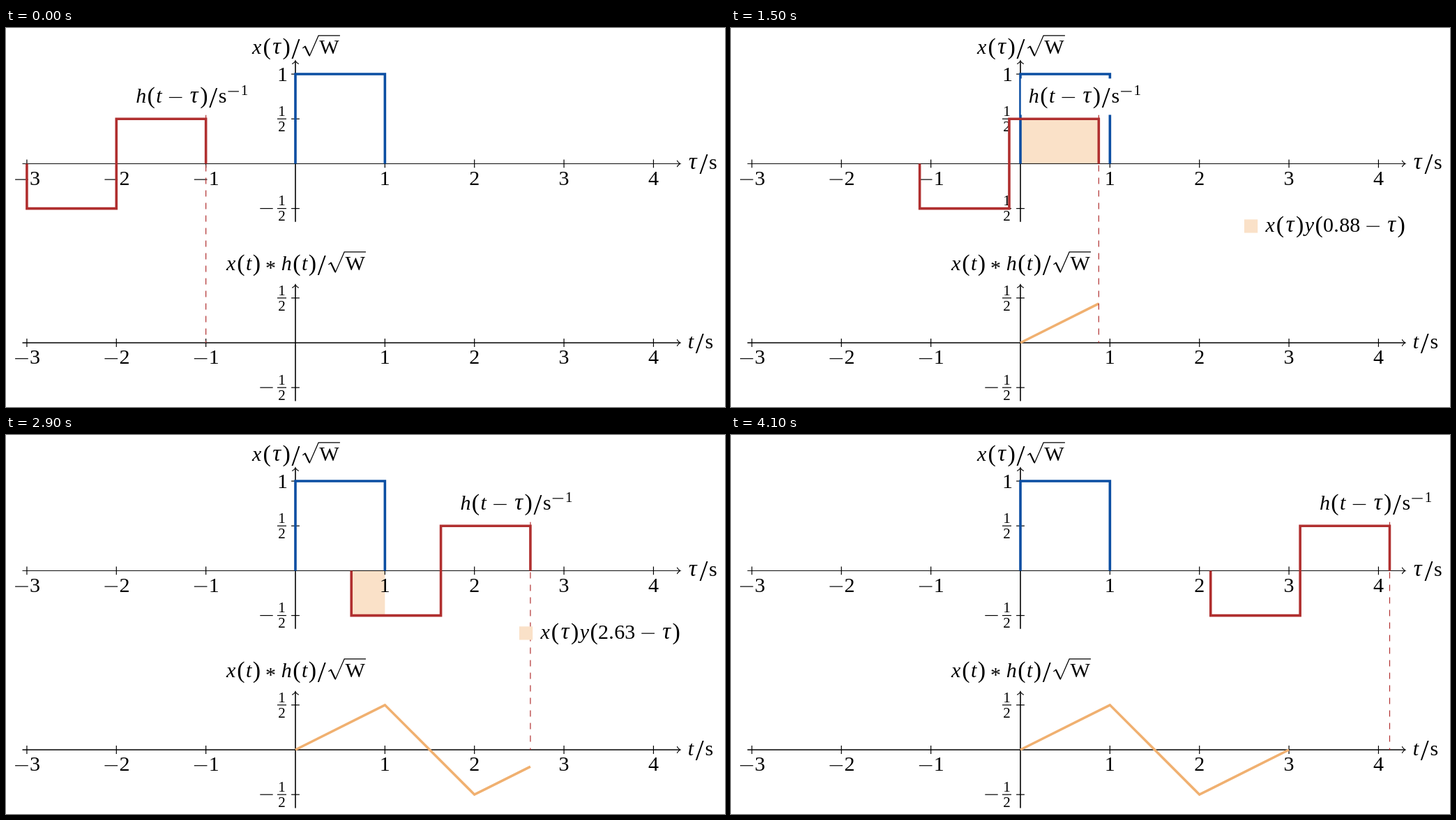
Animation of 1031 by 543 pixels, one loop 4200 ms. Source, as an HTML page:

```html
<!DOCTYPE html>
<html lang="en">
<head>
<meta charset="utf-8">
<title>Convolution of two pulses</title>
<style>
  html, body { margin: 0; width: 100%; height: 100%; overflow: hidden; background: #fff; }
  svg { display: block; font-family: "Liberation Serif", "Times New Roman", serif; }
</style>
</head>
<body>
<svg id="stage" width="1031" height="543" viewBox="0 0 1031 543"></svg>
<script>
const LOOP_MS = 4200, STEP_MS = 100;
const PT = 3, THIN = 0.4 * PT, THICK = 1.2 * PT;
const UNIT = 128.36, ORIGIN = 415, TOP = 194.4, BOTTOM = 451;
const BLUE = '#0b4ea2', RED = '#b02f2f', ORANGE = '#f0b070', PALE = '#fae1c8';

// Advance widths in points
const ADVANCE = {
  x: 5.72, t: 3.61, h: 5.76, y: 5.26, τ: 5.5, s: 3.94, W: 10.28,
  '(': 3.89, ')': 3.89, '/': 5, '√': 8.33, '−': 7.78, '*': 5, '.': 2.78, ' ': 2.22
};
// Glyphs whose font size and drop differ from the default
const SHAPE = { '(': [34, 1], ')': [34, 1], '/': [43, 7], '*': [30, 6.5], τ: [33, 0] };

const stage = document.getElementById('stage');
const px = v => ORIGIN + v * UNIT;
const py = (v, base = TOP) => base - v * UNIT;

function add(parent, tag, attrs, text) {
  const node = document.createElementNS('http://www.w3.org/2000/svg', tag);
  for (const key in attrs) node.setAttribute(key, attrs[key]);
  if (text) node.textContent = text;
  parent.appendChild(node);
  return node;
}
const group = () => add(stage, 'g', {});
const stroke = (parent, d, color = '#000', width = THIN) =>
  add(parent, 'path', { d, fill: 'none', stroke: color, 'stroke-width': width });

const advance = ch => (ADVANCE[ch] || 5) * PT;
const measure = str => [...str].reduce((sum, ch) => sum + advance(ch), 0);

function radical(parent, x, y) {
  const top = y - 25.8;
  stroke(parent, `M${x + 2.3} ${top + 18}L${x + 6} ${top + 15.2}`);
  stroke(parent, `M${x + 5.6} ${top + 15.2}L${x + 12} ${top + 28.5}`, '#000', 2.2);
  stroke(parent, `M${x + 12} ${top + 29.5}L${x + 25} ${top}h${advance('W')}`);
}

// Sets a formula from its left end; "^" starts a superscript.
function typeset(parent, str, x, y) {
  const line = add(parent, 'text', { 'text-anchor': 'middle' });
  let scale = 1, spread = 1;
  for (const ch of str) {
    if (ch === '^') { scale = 0.7; spread = 0.83; y -= 10.9; continue; }
    const width = advance(ch) * spread;
    if (ch === '−') {
      stroke(parent, `M${x + width * 0.1} ${y - 7.5 * scale}h${width * 0.8}`);
    } else if (ch === '√') {
      radical(parent, x, y);
    } else if (ch !== ' ') {
      const [size, drop] = SHAPE[ch] || [30, 0];
      add(line, 'tspan', {
        x: x + width / 2, y: y + drop, 'font-size': size * scale,
        'font-style': /[xthyτ]/.test(ch) ? 'italic' : 'normal'
      }, ch);
    }
    x += width;
  }
}
const centered = (parent, str, x, y) => typeset(parent, str, x - measure(str) / 2, y);

function half(parent, y, negative) {
  const digit = { x: 395.5, 'text-anchor': 'middle', 'font-size': 21 };
  add(parent, 'text', { ...digit, y: y - 4.3 }, '1');
  add(parent, 'text', { ...digit, y: y + 17.8 }, '2');
  stroke(parent, `M389 ${y}H402`);
  if (negative) stroke(parent, `M364.3 ${y}h18.4`);
  stroke(parent, `M409.1 ${y}h11.8`);
}

function arrow(parent, x, y, angle) {
  add(parent, 'path', {
    d: 'M-3.6-4.8C-3.3-3 0-.3.9 0C0 .3-3.3 3-3.6 4.8', fill: 'none', stroke: '#000',
    'stroke-width': 1.1, transform: `translate(${x} ${y}) rotate(${angle})`
  });
}

function axes(parent, base, weight, high, name, title, titleY) {
  const right = px(4.3), top = py(high, base);
  stroke(parent, `M${px(-3.05)} ${base}H${right}`, '#000', weight);
  stroke(parent, `M${ORIGIN} ${py(-0.65, base)}V${top}`, '#000', 1.6);
  arrow(parent, right - 1, base, 0);
  arrow(parent, ORIGIN, top + 1, -90);
  for (let i = -3; i <= 4; i++) {
    if (!i) continue;
    stroke(parent, `M${px(i)} ${base - 5.9}v11.8`);
    centered(parent, String(i).replace('-', '−'), px(i), base + 30.2);
  }
  half(parent, py(0.5, base), false);
  half(parent, py(-0.5, base), true);
  typeset(parent, name, 976.5, base + 7.5);
  centered(parent, title, ORIGIN, titleY);
}

// Back to front: overlap area, axes, pulse, result, moving kernel, legend
const overlap = add(stage, 'path', { fill: PALE });
const frame = group();
axes(frame, TOP, 1, 1.15, 'τ/s', 'x(τ)/√W', 36.7);
axes(frame, BOTTOM, 1.6, 0.65, 't/s', 'x(t) * h(t)/√W', 346.7);
stroke(frame, `M409.1 ${py(1)}h11.8`);
centered(frame, '1', 396.5, py(1) + 9.7);
stroke(frame, `M${px(0)} ${TOP}V${py(1)}H${px(1)}V${TOP}`, BLUE, THICK);

const result = stroke(stage, '', ORANGE, THICK);

const kernel = group();
stroke(kernel, `M0 124.4V${BOTTOM}`, RED).setAttribute('stroke-dasharray', '9 9');
stroke(kernel, `M${-2 * UNIT} ${TOP}V${py(-0.5)}H${-UNIT}V${py(0.5)}H0V${TOP}`, RED, THICK);
add(kernel, 'rect', { x: -111.6, y: 72.4, width: 183.2, height: 52, fill: '#fff' });
typeset(kernel, 'h(t − τ)/s^−1', -101.6, 107);

const legend = group();
add(legend, 'rect', { x: 736, y: 274.3, width: 19.2, height: 19.2, fill: PALE });
const formula = add(legend, 'g', {});

function overlapBox(from, to, level) {
  const a = Math.max(0, from), b = Math.min(1, to);
  return a < b ? `M${px(a)} ${TOP}V${py(level)}H${px(b)}V${TOP}Z` : '';
}

function convolution(t) {
  if (t <= 1) return t / 2;
  if (t <= 2) return 1.5 - t;
  return (t - 3) / 2;
}

function resultPath(t) {
  if (t <= 0) return '';
  const end = Math.min(t, 3);
  const knots = [0, 1, 2].filter(k => k < end).concat(end);
  return 'M' + knots.map(k => `${px(k)} ${py(convolution(k), BOTTOM)}`).join('L');
}

function draw(step) {
  const t = -1 + step / 8;
  kernel.setAttribute('transform', `translate(${px(t)} 0)`);
  overlap.setAttribute('d', overlapBox(t - 1, t, 0.5) + overlapBox(t - 2, t - 1, -0.5));
  result.setAttribute('d', resultPath(t));
  const active = t > 0 && t < 3;
  legend.setAttribute('visibility', active ? 'visible' : 'hidden');
  formula.replaceChildren();
  if (active) {
    const shift = (Math.round(t * 100) / 100).toFixed(2);
    typeset(formula, `x(τ)y(${shift} − τ)`, 764.5, 291.7);
  }
}

let shown = -1;
function tick() {
  const step = Math.floor(performance.now() % LOOP_MS / STEP_MS);
  if (step !== shown) draw(shown = step);
  requestAnimationFrame(tick);
}
tick();
</script>
</body>
</html>
```
